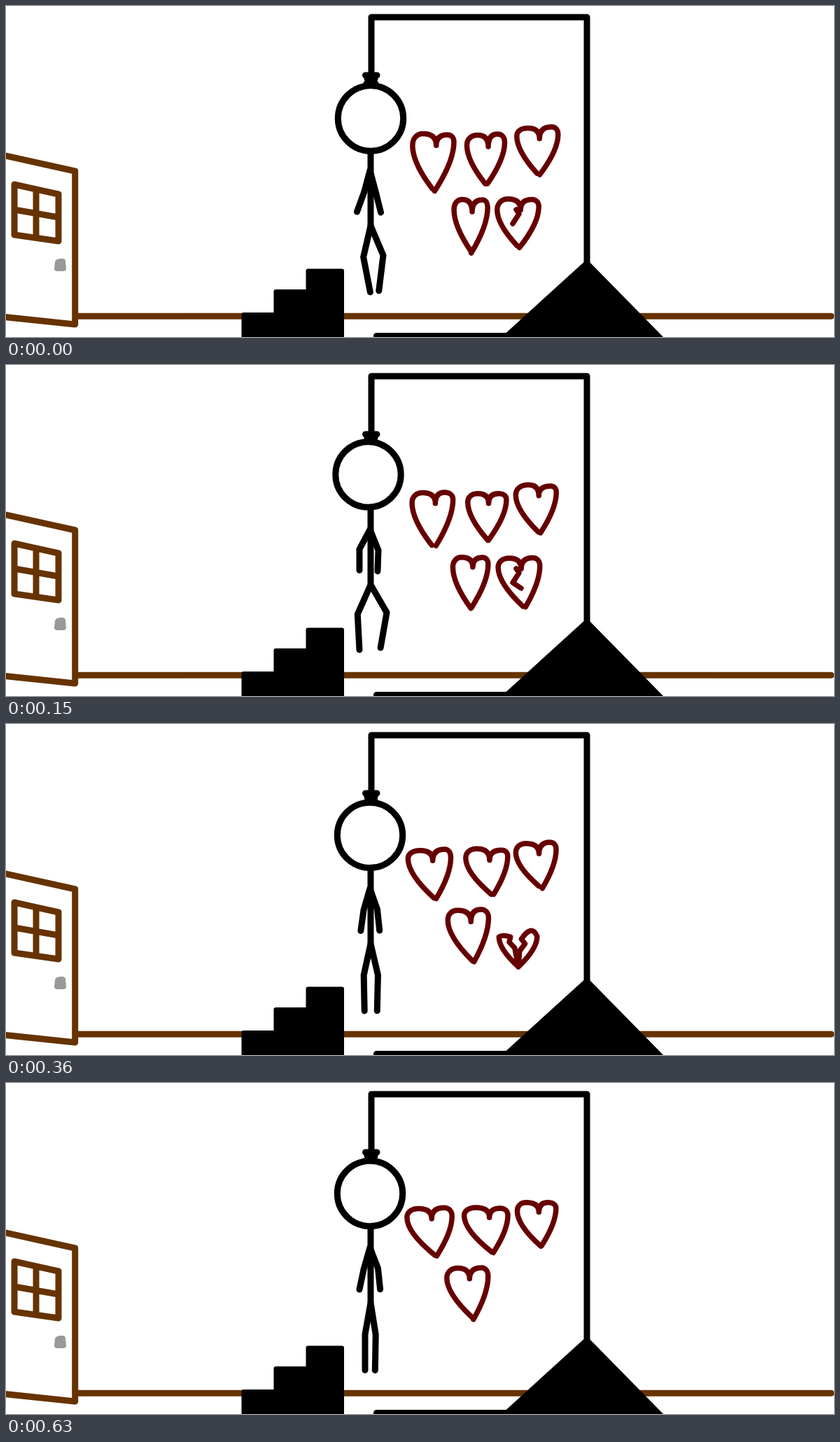
Recreate the animation shown at these times as an HTML page. Size 1183 by 473 pixels, loop 0.9 s.

```html
<!DOCTYPE html>
<html lang="en">
<head>
<meta charset="utf-8">
<title>Hangman</title>
<style>
  html, body { margin: 0; width: 100%; height: 100%; overflow: hidden; background: #fff; }
  svg { display: block; width: 1183px; height: 473px; }
  path, circle { stroke-linecap: round; stroke-linejoin: round; }
</style>
</head>
<body>
<svg viewBox="0 0 1183 473">
  <g fill="none" stroke="#630" stroke-width="9">
    <path d="M103 443.3H1179"/>
    <path d="M-6 212.7L98.7 236V455L-6 444"/>
    <path d="M12 255L75 269V336L12 327ZM43 262V331M12 291L75 302"/>
  </g>
  <path d="M74 366L77 365H81L82 375H73Z" fill="#999" stroke="#999" stroke-width="8"/>
  <path d="M339.5 480V441H385.5V408H431.5V378.5H480V480Z" stroke="#000" stroke-width="6"/>
  <path d="M830 362L708 473H939Z"/>
  <g fill="none" stroke="#000" stroke-width="9">
    <path d="M522 100V16H830V370M529.5 471.5H720"/>
    <path d="M515 111H528"/>
    <circle id="head" r="46.7" fill="#fff"/>
    <path d="M521 208V313"/>
    <path id="limbs"/>
  </g>
  <path d="M513.5 99H530M516 104H527" stroke="#000" stroke-width="9"/>
  <path id="hearts" fill="none" stroke="#600" stroke-width="7.5"/>
</svg>
<script>
const LOOP = 900, STEP = 30, HOLD = 90, LAST_SKETCH = 6;
const byId = id => document.getElementById(id);
const mix = (a, b, k) => a + (b - a) * k;
const mixAll = (a, b, k) => a.map((v, i) => mix(v, b[i], k));
const easeOut = k => Math.sin(k * Math.PI / 2);

// Limb angles in degrees from straight down: upper part, then lower part
const poses = [
  { time: 0,   head: [521, 160.5], arms: [-15, -20, 15, 14], legs: [-13, 11, 23, -7] },
  { time: 150, head: [517.5, 156.5], arms: [-28, 0, 22, -2], legs: [-24, 3, 30, -10] },
  { time: 270, head: [520, 161], arms: [-17, 2, 15, 6], legs: [-18, 4, 23, -2] },
  { time: 450, head: [520, 158], arms: [-16, -12, 21, 6], legs: [-10, 0, 9, -1] }
];

function poseAt(t) {
  const next = poses.findIndex(pose => pose.time > t);
  if (next < 0) return poses[poses.length - 1];
  const a = poses[next - 1], b = poses[next];
  const k = easeOut((t - a.time) / (b.time - a.time));
  const blend = part => mixAll(a[part], b[part], k);
  return { head: blend('head'), arms: blend('arms'), legs: blend('legs') };
}

function limbPair(x, y, lengths, angles) {
  const reach = ([px, py], length, degrees) => {
    const a = degrees * Math.PI / 180;
    return [px + length * Math.sin(a), py + length * Math.cos(a)];
  };
  return [0, 2].map(i => {
    const joint = reach([x, y], lengths[0], angles[i]);
    return `M${x} ${y}L${joint} ${reach(joint, lengths[1], angles[i + 1])}`;
  }).join('');
}

// Boxes as x, y, width, height: each heart drifts from the first to the second
const hearts = [
  [[581, 183, 58, 80], [573, 179, 63, 69]],
  [[659, 184, 54, 71], [656, 178, 62, 65]],
  [[730, 173, 58, 68], [729, 170, 56, 63]],
  [[640, 277, 48, 75], [629, 264, 60, 73]]
];
const doomedHeart = [703, 277, 59, 68];

function seededRandom(seed) {
  return () => {
    const v = Math.sin(++seed * 12.9898) * 43758.5453;
    return v - Math.floor(v);
  };
}

function halfHeart([ex, ey], [sx, sy], [lx, ly], [dx, dy]) {
  return `M${ex} ${ey}Q${sx} ${mix(sy, ey, .4)} ${sx} ${sy}` +
    `C${sx} ${mix(sy, ly, .6)} ${mix(lx, sx, .6)} ${ly} ${lx} ${ly}Q${dx} ${ly} ${dx} ${dy}`;
}

// Every redraw wobbles a little, as by hand
function heartPath([x, y, w, h], lean, random) {
  const wobble = () => (random() - .5) * 3;
  const at = (u, v) => [x + u * w + wobble(), y + v * h + wobble()];
  const dip = at(.56, .22), tip = mix(.5, .63, lean);
  return halfHeart(at(tip - .02, .98), at(0, .2), at(.27, 0), dip) +
    halfHeart(at(tip + .04, 1), at(1, .15), at(.83, 0), dip);
}

// Two jagged halves that shrink towards their common tip
function brokenHeart(size) {
  const p = (x, y) => `${732 + x * Math.sqrt(size)} ${347 + y * size}`;
  return `M${p(0, 0)}Q${p(-32, -34)} ${p(-32, -57)}Q${p(-26, -62)} ${p(-13, -57)}` +
    `L${p(-15, -47)} ${p(-6, -36)} ${p(0, 0)}` +
    `Q${p(31, -34)} ${p(31, -58)}Q${p(22, -82)} ${p(5, -53)}L${p(11, -44)} ${p(2, -30)} ${p(0, 0)}`;
}

function crackedHeart(phase, random) {
  const crack = [[729, 291], [733, 297], [724, 311], [736, 319]];
  return heartPath(doomedHeart, phase, random) + 'M' + crack.slice(0, phase + 3).join('L');
}

function heartsPath(phase) {
  const sketch = Math.min(phase, LAST_SKETCH);
  const random = seededRandom(sketch * 100);
  const k = easeOut(sketch / LAST_SKETCH);
  let path = hearts.map(([from, to]) => heartPath(mixAll(from, to, k), k, random)).join('');
  if (phase < 2) path += crackedHeart(phase, random);
  else if (phase < 7) path += brokenHeart(Math.min(1, (7 - phase) / 4));
  return path;
}

function draw() {
  const t = Math.floor(performance.now() % LOOP / STEP) * STEP;
  const { head, arms, legs } = poseAt(t);
  byId('head').setAttribute('cx', head[0]);
  byId('head').setAttribute('cy', head[1]);
  byId('limbs').setAttribute('d',
    limbPair(520, 235, [32, 30], arms) + limbPair(521, 314, [46, 51], legs));
  byId('hearts').setAttribute('d', heartsPath(Math.floor(t / HOLD)));
  requestAnimationFrame(draw);
}
draw();
</script>
</body>
</html>
```
